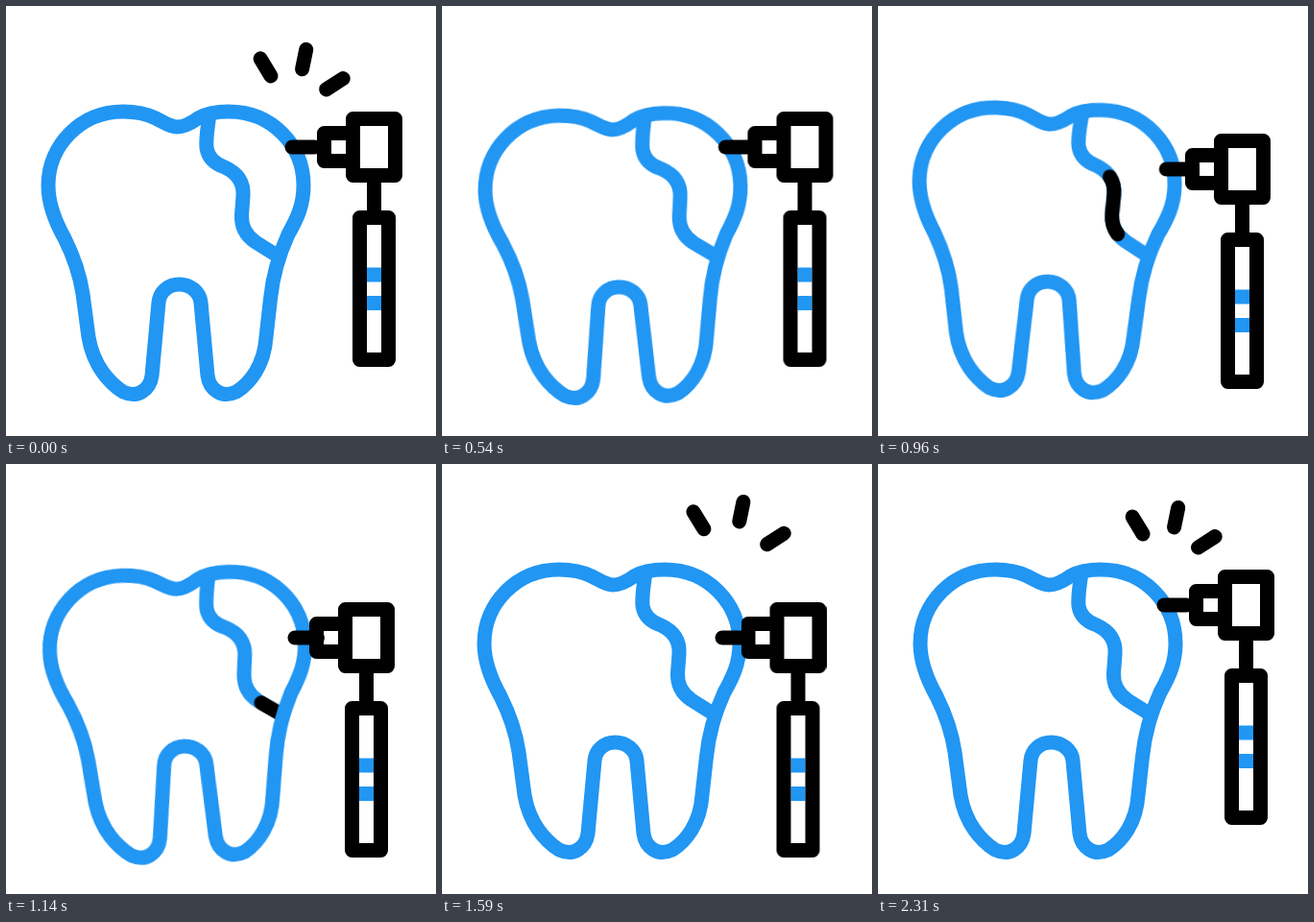
Write an HTML page without scripts that moves like this. It is 448 by 448 pixels and loops after 2.34 s.

```html
<!DOCTYPE html>
<html lang="en">
<head>
<meta charset="utf-8">
<title>Dental drill</title>
<style>
  html, body { margin: 0; width: 100%; height: 100%; overflow: hidden; background: #fff; }
  svg { display: block; width: 100%; height: 100%; fill: none; stroke-width: 15; stroke-linejoin: round; }
  .blue { stroke: #2196f3; }
  .black { stroke: #000; }
  .round { stroke-linecap: round; }

  .tooth, .drill, .bit, .glint, .sparks { animation: 2340ms linear infinite; }
  .tooth { transform-origin: 300px 147px; animation-name: shake; animation-timing-function: ease-in-out; }
  .drill { animation-name: drill; }
  .bit { animation-name: bit; }
  .glint { stroke-dasharray: 60 300; animation-name: glint; }
  .sparks { stroke-dasharray: 21 60; animation-name: sparks; }

  @keyframes shake {
    0%, 15.8%, 63.7%, 69%, 81%, 100% { transform: rotate(0deg); }
    18.8%, 30.77%, 42.74%, 54.7%, 72% { transform: rotate(2deg); }
    24.8%, 36.75%, 48.72%, 60.7%, 78% { transform: rotate(-2deg); }
  }
  @keyframes drill {
    0%, 28.2%, 30.77%, 92.3%, 100% { transform: translate(0, 0); }
    14.1%, 16.7% { transform: translate(-12.5px, 0); }
    46% { transform: translate(-6px, 34px); }
    48.72% { transform: translate(-8px, 34px); }
    54%, 69% { transform: translate(-12.5px, 34px); }
    84.6% { transform: translate(-4.5px, 7px); }
  }
  /* The bit slides back into the head while the drill pushes. */
  @keyframes bit {
    0%, 28.2%, 30.77%, 92.3%, 100% { transform: translateX(0); }
    14.1%, 16.7%, 54%, 69% { transform: translateX(6.5px); }
    48.72% { transform: translateX(11px); }
    84.6% { transform: translateX(1.5px); }
  }
  @keyframes glint {
    0%, 26.9% { stroke-dashoffset: 62; }
    30.77% { stroke-dashoffset: 21; }
    48.72% { stroke-dashoffset: -150; }
    51.4%, 100% { stroke-dashoffset: -177; }
  }
  /* Each burst slides a dash outward, then resets while it is off the line. */
  @keyframes sparks {
    0%, 98.7%, 100% { stroke-dashoffset: 0; }
    9%, 39%, 75.4% { stroke-dashoffset: -33; }
    9.01%, 23.6%, 39.01%, 60%, 75.41%, 92.6% { stroke-dashoffset: 22; }
    30.77% { stroke-dashoffset: -3.5; }
    67.95% { stroke-dashoffset: -6; }
  }
</style>
</head>
<body>
<svg viewBox="0 0 448 448">
  <defs>
    <path id="crack" pathLength="175" d="M211.5 116 C210 128 208 138 209 148 C211 160 219 165 228 168
      C241 174 248 184 247 198 L245.5 218 C245 232 251 240 260 246 L284 261"/>
  </defs>

  <g class="tooth">
    <use href="#crack" class="blue"/>
    <use href="#crack" class="black round glint"/>
    <path class="blue" d="M178 126 C171 126 164 121 156 117 C146 112 134 110 122 110
      C78 110 44 145 44 187 C44 208 52 226 61 242
      C70 260 77 280 80 300 L86 345 C91 375 108 393 122 402 C137 409 150 400 152 385
      L159 309 C160 298 169 290 180.5 290 C192 290 202 298 203 309
      L210 385 C212 400 225 409 240 402 C254 393 269 375 271 345
      L275.5 305 C278 280 284 260 294 238 C303 222 310 208 310 187
      C310 145 277 110 232 110 C222 110 210 111 200 117 C193 122 186 126 178 126Z"/>
  </g>

  <g class="drill">
    <path class="blue" d="M376 280H391M376 309.5H391"/>
    <g class="black">
      <path class="round bit" d="M298 147H321.5"/>
      <rect x="331.5" y="132.5" width="30" height="29"/>
      <rect x="361.5" y="117.5" width="44" height="59"/>
      <path d="M383.5 177V220"/>
      <rect x="368.5" y="220.5" width="30" height="148"/>
    </g>
  </g>

  <g class="black round sparks">
    <path d="M276 73L260 46.5"/>
    <path d="M308.5 66L314.7 35.6"/>
    <path d="M333.5 87L359.5 70.2"/>
  </g>
</svg>
</body>
</html>
```
